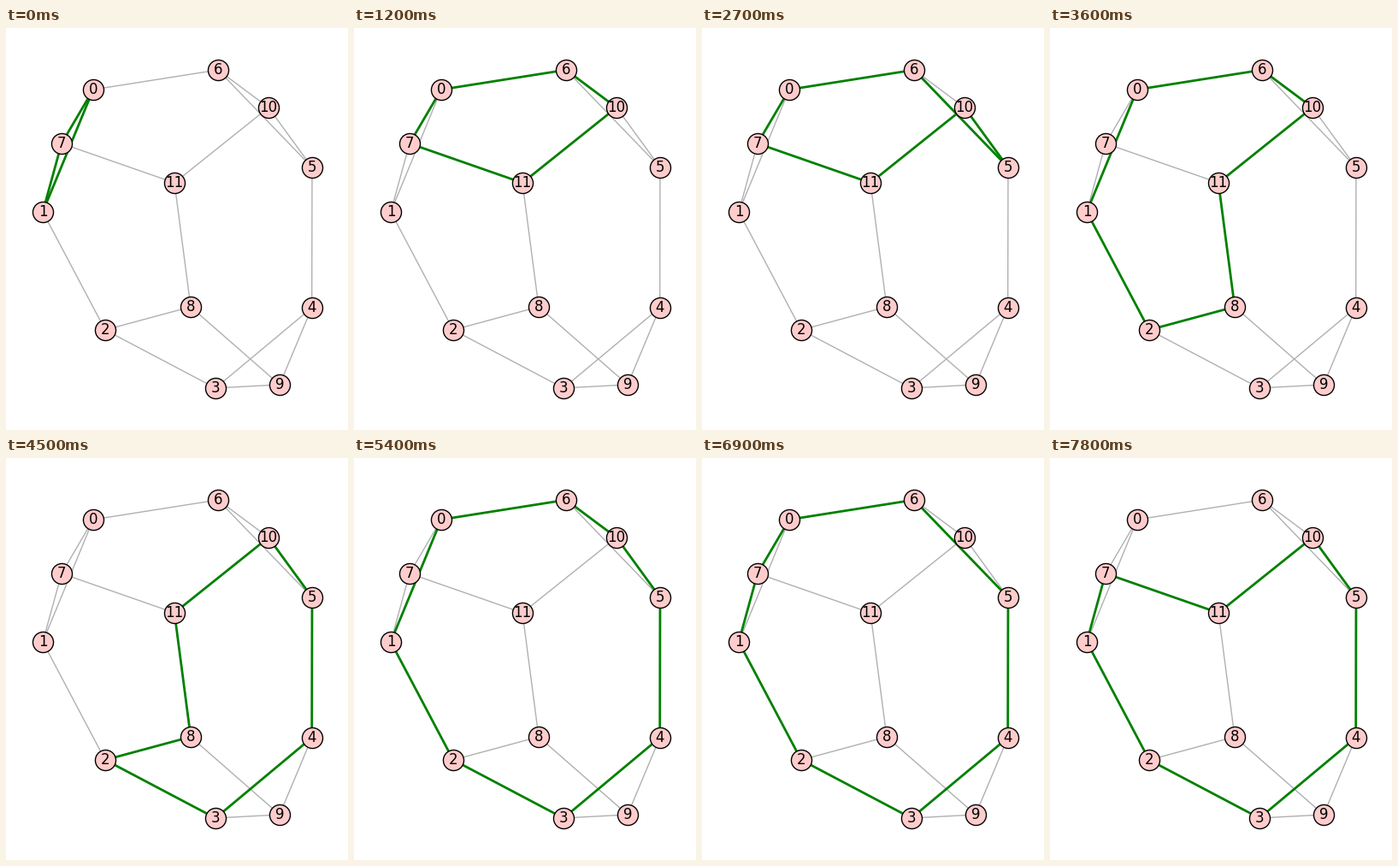
A matplotlib script for the animation above (8000 ms loop, 400 by 470 pixels).

```python
import matplotlib.pyplot as plt
from matplotlib.animation import FuncAnimation
from matplotlib.collections import LineCollection

W, H, DPI = 400, 470, 100
INTERVAL, FRAMES, HOLD = 100, 80, 3  # each cycle is held for HOLD frames

# Frucht graph: an outer ring of seven nodes, then the inner hubs
RING = [(102, 72), (43, 215), (116, 353), (245, 421),
        (357.7, 327), (358, 163), (248, 49)]
HUBS = [(65, 135), (216, 326), (320, 417), (307, 93), (197, 181)]
POS = RING + HUBS
N = len(RING)

ring_edges = [(i, (i + 1) % N) for i in range(N)]
spokes = [(i, N + (4 * i + 2) // N) for i in range(N)]
EDGES = ring_edges + spokes + [(7, 11), (8, 11), (10, 11), (8, 9)]

NEIGHBORS = {n: set() for n in range(len(POS))}
for a, b in EDGES:
    NEIGHBORS[a].add(b)
    NEIGHBORS[b].add(a)


def simple_cycles(path):
    """Yield each cycle once: smallest node first, second node below the last."""
    for node in NEIGHBORS[path[-1]]:
        if node == path[0] and len(path) > 2 and path[1] < path[-1]:
            yield path
        elif node > path[0] and node not in path:
            yield from simple_cycles(path + [node])


def segments(pairs):
    return [(POS[a], POS[b]) for a, b in pairs]


CYCLES = sorted((c for n in NEIGHBORS for c in simple_cycles([n])),
                key=lambda c: (len(c), c))

fig = plt.figure(figsize=(W / DPI, H / DPI), dpi=DPI, facecolor="white")
ax = fig.add_axes([0, 0, 1, 1])
ax.set_xlim(0, W)
ax.set_ylim(H, 0)
ax.axis("off")

ax.add_collection(LineCollection(segments(EDGES), colors="#b0b0b0",
                                 linewidths=1, zorder=1), autolim=False)
highlight = LineCollection([], colors="green", linewidths=2, zorder=2)
ax.add_collection(highlight, autolim=False)
ax.scatter(*zip(*POS), s=300, c="#ffcccc", edgecolors="black",
           linewidths=1, zorder=3)
for label, (x, y) in enumerate(POS):
    ax.text(x, y, str(label), family="DejaVu Sans", size=12,
            ha="center", va="center", zorder=4)


def update(frame):
    cycle = CYCLES[frame // HOLD]
    highlight.set_segments(segments(zip(cycle, cycle[1:] + cycle[:1])))
    return [highlight]


anim = FuncAnimation(fig, update, frames=FRAMES, interval=INTERVAL,
                     repeat=True, repeat_delay=0)
plt.show()
```
